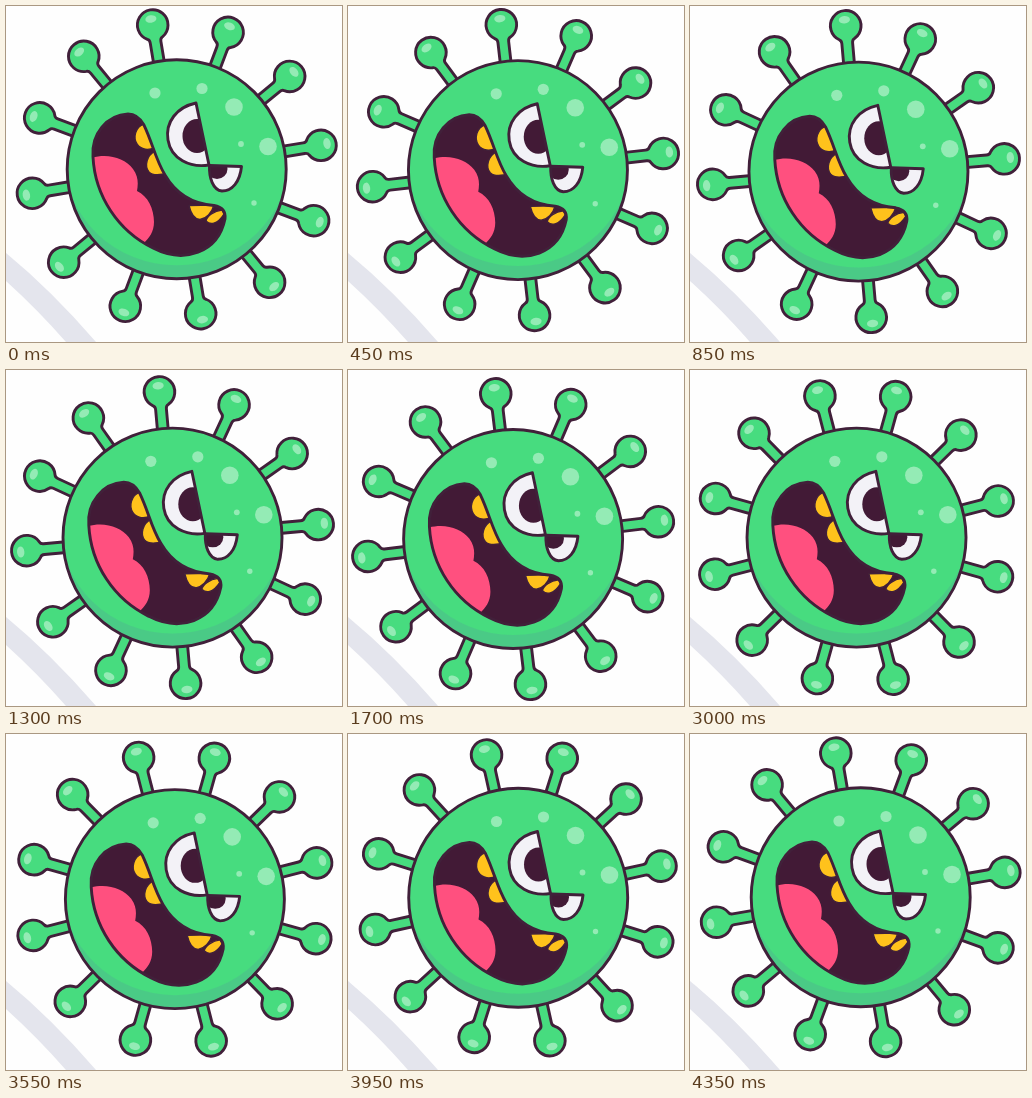
Animation of 336 by 336 pixels, one loop 4400 ms. Source, as an HTML page:

```html
<!DOCTYPE html>
<html lang="en">
<head>
<meta charset="utf-8">
<title>Angry virus</title>
<style>
  html, body { margin: 0; width: 100%; height: 100%; overflow: hidden; background: #fefefe; }
  svg { display: block; width: 100vw; height: 100vh; }
  .line { stroke: #41203a; stroke-width: 2.9; stroke-linejoin: round; stroke-linecap: round; }
  .green { fill: #47dc7f; }
  .shade { fill: #4aca86; }
  .spot { fill: #94ebb5; }
  .dark { fill: #421a36; }
  .white { fill: #f3f2f7; }
  .tooth { fill: #ffc21c; stroke-width: 1.4; }
</style>
</head>
<body>
<svg viewBox="0 0 336 336">
  <defs>
    <clipPath id="bodyClip"><circle r="109.9"/></clipPath>
    <path id="mouth" d="M122 108 C101 109 85 128 87 151 C89 190 112 225 147 242 C178 258 212 247 219 213 C220 205 216 201 208 199.5 C187 198 170 188 159 169 C149 152 147 138 138 119 C134 112 129 108 122 108Z"/>
    <path id="eyeBig" d="M190 97 C171 101 159 116 162 134 C165 153 184 162 203 159Z"/>
    <path id="eyeSmall" d="M203.5 159.5 L235.5 160.5 C234 176 226 185 216 185 C207 184 203 172 203.5 159.5Z"/>
    <clipPath id="mouthClip"><use href="#mouth"/></clipPath>
    <clipPath id="bigClip"><use href="#eyeBig"/></clipPath>
    <clipPath id="smallClip"><use href="#eyeSmall"/></clipPath>
    <g id="spike">
      <path class="green line" d="M-5.4 -104 V-129 Q-5.4 -132 -7.6 -133 A15.3 15.3 0 1 1 7.6 -133 Q5.4 -132 5.4 -129 V-104Z"/>
      <ellipse class="spot" cx="-0.8" cy="-152.5" rx="5.6" ry="3.7"/>
    </g>
  </defs>

  <path fill="#e4e5ed" d="M0 247 Q46 285 90 336 H60 Q32 304 0 275Z"/>

  <g id="virus">
    <g id="spikes"></g>
    <circle class="shade" r="109.9"/>
    <ellipse class="green" cy="-13" rx="113" ry="109" clip-path="url(#bodyClip)"/>
    <circle class="line" r="109.5" fill="none"/>

    <g transform="translate(-170.7 -163.3)">
      <g class="spot">
        <circle cx="149" cy="87" r="5.6"/>
        <circle cx="196" cy="82.5" r="5.6"/>
        <circle cx="228" cy="101" r="8.8"/>
        <circle cx="262" cy="140.5" r="8.8"/>
        <circle cx="235" cy="138" r="2.9"/>
        <circle cx="248" cy="197" r="2.7"/>
      </g>

      <use href="#mouth" class="dark"/>
      <g clip-path="url(#mouthClip)">
        <path fill="#ff507f" d="M80 154 C98 146 118 151 127 163 C133 171 132 179 131 185 C142 190 148 203 148 216 C148 226 143 232 138 237 L80 250Z"/>
        <g class="tooth line">
          <path d="M138 118 C129 121 127 132 131 138 C135 144 143 145 149 141Z"/>
          <path d="M149 145 C141 149 138 160 143 166 C147 170 155 169 162 167Z"/>
          <path d="M183 199.5 C185 208 189 213.5 194 213.5 C200 212.5 206 207 208 199Z"/>
          <path d="M216 204 C208 205 201 210 200 215 C204 219 211 219 218 208Z"/>
        </g>
      </g>
      <use href="#mouth" class="line" fill="none"/>

      <use href="#eyeBig" class="white"/>
      <ellipse class="dark" cx="191" cy="130" rx="14.5" ry="17" clip-path="url(#bigClip)"/>
      <use href="#eyeBig" class="line" fill="none"/>
      <use href="#eyeSmall" class="white"/>
      <ellipse class="dark" cx="211" cy="163" rx="10.5" ry="10" clip-path="url(#smallClip)"/>
      <use href="#eyeSmall" class="line" fill="none"/>
    </g>
  </g>
</svg>
<script>
  const LOOP = 4400;
  const LEAD = 50;
  const virus = document.getElementById('virus');
  const spikes = document.getElementById('spikes');

  spikes.innerHTML = Array.from({ length: 12 }, (_, i) =>
    `<use href="#spike" transform="rotate(${i * 30})"/>`).join('');

  // The body drifts along a diagonal while the ring of spikes rocks a quarter cycle behind.
  function draw(time) {
    const phase = 2 * Math.PI * ((time + LEAD) % LOOP) / LOOP;
    const drift = Math.cos(phase);
    virus.setAttribute('transform', `translate(${167.6 + 3.1 * drift} ${166.5 - 3.2 * drift})`);
    spikes.setAttribute('transform', `rotate(${-9.8 + 5 * Math.sin(phase)})`);
  }

  const start = performance.now();
  function tick() {
    draw(performance.now() - start);
    requestAnimationFrame(tick);
  }
  tick();
</script>
</body>
</html>
```
